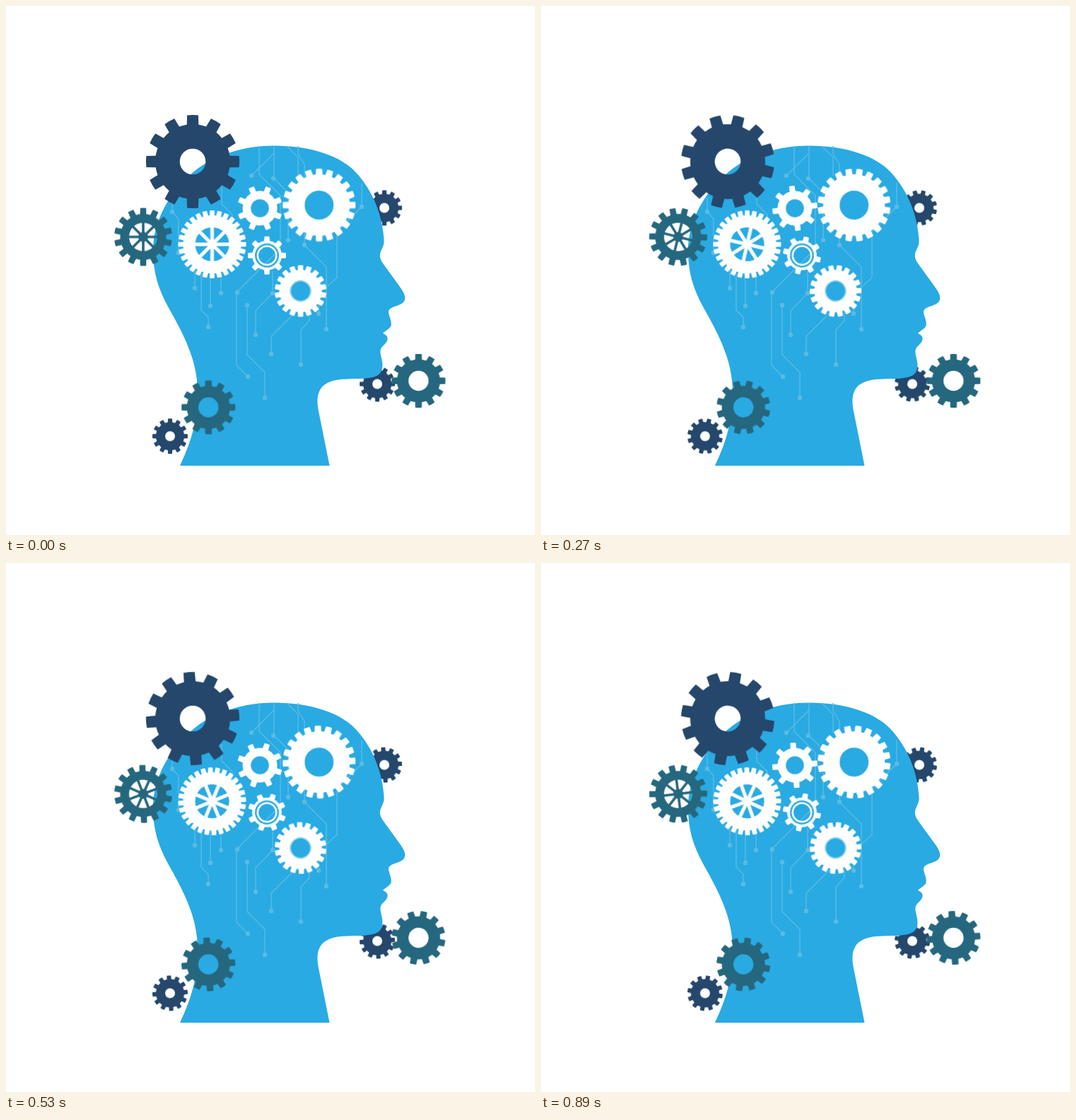
An HTML page that plays this animation: 748 px wide and 748 px high, repeating every 990 ms.

```html
<!DOCTYPE html>
<html lang="en">
<head>
<meta charset="utf-8">
<title>Thinking gears</title>
<style>
html, body { margin: 0; width: 100%; height: 100%; overflow: hidden; background: #fff; }
svg { display: block; width: 100%; height: 100%; }
</style>
</head>
<body>
<svg viewBox="0 0 748 748">
  <g id="back"></g>
  <path fill="#29aae3" d="M246 650H457.500L442 573C440 562 439.500 552 443 545C449 532 463 528 482 527.500
    C499 526.500 516 528 526 522C532 518 533 511 532 503C531 496 528 490 530 485C532 480 539 477 539.500 471
    C540 466 536 465 533 462.500C537 459 543 456 544.500 452C546 445 540 436 541 431.500C543 424 558 425 563 417.500
    C566 412 563 406 559 400L533 364C529 358 527.500 353 530 347C532 342 535 338 534.500 331
    C533 304 524 270 499 240C476 211 429 197.500 379 197.500C340 197.500 292 209 259 240
    C227 270 208 307 208 346C208 377 215 399 229 425C249 461 271 499 271 546C271 590 260 620 246 650Z"/>
  <g id="traces" fill="none" stroke="#5bbbe2" stroke-width="1.4"></g>
  <g id="front"></g>
</svg>
<script>
const NS = "http://www.w3.org/2000/svg";
const LOOP = 990;
const STARTS = [0, 270, 530, 730];
const NAVY = "#24476b", TEAL = "#25677e", WHITE = "#fff";

function add(parent, tag, attrs) {
  const el = document.createElementNS(NS, tag);
  for (const key in attrs) el.setAttribute(key, attrs[key]);
  parent.appendChild(el);
  return el;
}

const ring = r => `M${r} 0A${r} ${r} 0 1 0 ${-r} 0A${r} ${r} 0 1 0 ${r} 0Z`;

// root and tip are the half widths of a tooth as shares of the pitch
function gearPath(teeth, outer, inner, hole, root, tip) {
  const pitch = 2 * Math.PI / teeth;
  const at = (r, a) => (r * Math.sin(a)).toFixed(2) + " " + (-r * Math.cos(a)).toFixed(2);
  let d = "";
  for (let i = 0; i < teeth; i++) {
    const a = i * pitch;
    d += (i ? `A${inner} ${inner} 0 0 1 ` : "M") + at(inner, a - root * pitch);
    d += "L" + at(outer, a - tip * pitch);
    d += `A${outer} ${outer} 0 0 1 ` + at(outer, a + tip * pitch);
    d += "L" + at(inner, a + root * pitch);
  }
  return d + `A${inner} ${inner} 0 0 1 ` + at(inner, -root * pitch) + "Z" + ring(hole);
}

function gear(layer, g) {
  const place = add(document.getElementById(layer), "g", { transform: `translate(${g.x} ${g.y})` });
  const wheel = add(place, "g", { fill: g.color });
  const soft = g.color === WHITE;
  const trim = soft ? 0.8 : 0;
  add(wheel, "path", {
    d: gearPath(g.teeth, g.outer - trim, g.inner - trim, g.hole + trim, g.root || 0.3, g.tip || 0.23),
    "fill-rule": "evenodd", stroke: soft ? WHITE : "none", "stroke-width": 2 * trim, "stroke-linejoin": "round"
  });
  if (g.spoke) {
    for (let a = 0; a < 180; a += 45)
      add(wheel, "path", { d: `M0 ${-g.hole - 1}V${g.hole + 1}`, transform: `rotate(${a})`, stroke: g.color, "stroke-width": g.spoke });
    add(wheel, "circle", { r: g.hub });
  }
  if (g.band) add(wheel, "circle", { r: g.band, fill: "none", stroke: WHITE, "stroke-width": 2.6 });
  if (g.line) add(wheel, "circle", { r: g.line, fill: "none", stroke: "#29aae3", "stroke-width": 0.7 });
  const frames = STARTS.map((t, i) => ({ offset: t / LOOP, transform: `rotate(${g.turn[i]}deg)`, easing: "steps(1, end)" }));
  frames.push({ ...frames[0], offset: 1 });
  wheel.animate(frames, { duration: LOOP, iterations: Infinity });
}

const traces = document.getElementById("traces");
[
  "M358 198V238L388 268V345", "M347 240L379 208V198V244L399 264V331", "M397 198L413 214V240",
  "M413 198V209L422 224V338L453 369V457", "M503 250V284L468 319V384L453 398",
  "M235 270V291L244 301V349", "M305 256V280L320 295V310", "M267 399V370", "M276 378V430L286 440V454",
  "M289 424V378", "M304 406V378", "M388 343L326 405V508L342 524", "M341 423V493L366 518V554",
  "M353 465V431L377 406V375", "M375 492V467L408 434", "M417 507V458L429 445V430", "M442 435V420"
].forEach(d => add(traces, "path", { d }));
[
  [347, 240], [378, 244], [235, 291], [244, 349], [267, 399], [289, 424], [304, 406],
  [286, 454], [327, 405], [341, 423], [353, 465], [375, 492], [342, 524], [366, 554],
  [417, 507], [453, 457], [442, 435], [422, 338], [399, 331], [503, 284], [377, 406]
].forEach(([cx, cy]) => add(traces, "circle", { cx, cy, r: 3.2, fill: "#5bbbe2", stroke: "none" }));

const small = { color: NAVY, teeth: 12, outer: 25, inner: 20, hole: 7 };
const medium = { color: TEAL, teeth: 12, outer: 38, inner: 30.5, hole: 14.2 };

gear("back", { ...small, x: 535, y: 285.5, turn: [0, 14, -4, 10] });
gear("back", { ...small, x: 525, y: 534.5, turn: [0, 14, -4, 10] });
gear("front", { ...medium, x: 583.3, y: 530, turn: [0, 0, 12, -4] });
gear("front", { color: NAVY, x: 264, y: 220, teeth: 12, outer: 66, inner: 53, hole: 18.3, turn: [0, 14, -4.5, 10] });
gear("front", { color: TEAL, x: 194, y: 326.5, teeth: 14, outer: 41, inner: 32.5, hole: 20, spoke: 3.6, hub: 7, turn: [0, 14, 24, 38] });
gear("front", { ...medium, x: 286.200, y: 567.500, turn: [0, 14, -4, 10] });
gear("front", { ...small, x: 232, y: 608.300, turn: [0, 14, -4, 10] });
gear("front", { color: WHITE, x: 291.5, y: 337, teeth: 28, outer: 48, inner: 41, hole: 24, spoke: 5, hub: 5, turn: [0, 13, 22.5, 25] });
gear("front", { color: WHITE, x: 442.7, y: 281.5, teeth: 20, outer: 51.5, inner: 43.5, hole: 20.5, turn: [0, 9, -2, 7] });
gear("front", { color: WHITE, x: 359, y: 286, teeth: 8, outer: 32, inner: 24.5, hole: 12.8, root: 0.18, tip: 0.13, turn: [22.5, -8, 19, -5] });
gear("front", { color: WHITE, x: 369, y: 352.7, teeth: 8, outer: 27, inner: 21, hole: 17, band: 13.2, root: 0.2, tip: 0.14, turn: [0, 14, 20, 11] });
gear("front", { color: WHITE, x: 416.5, y: 403, teeth: 18, outer: 36.5, inner: 30, hole: 13.7, line: 14.8, turn: [0, 9, -2, 7] });
</script>
</body>
</html>
```
